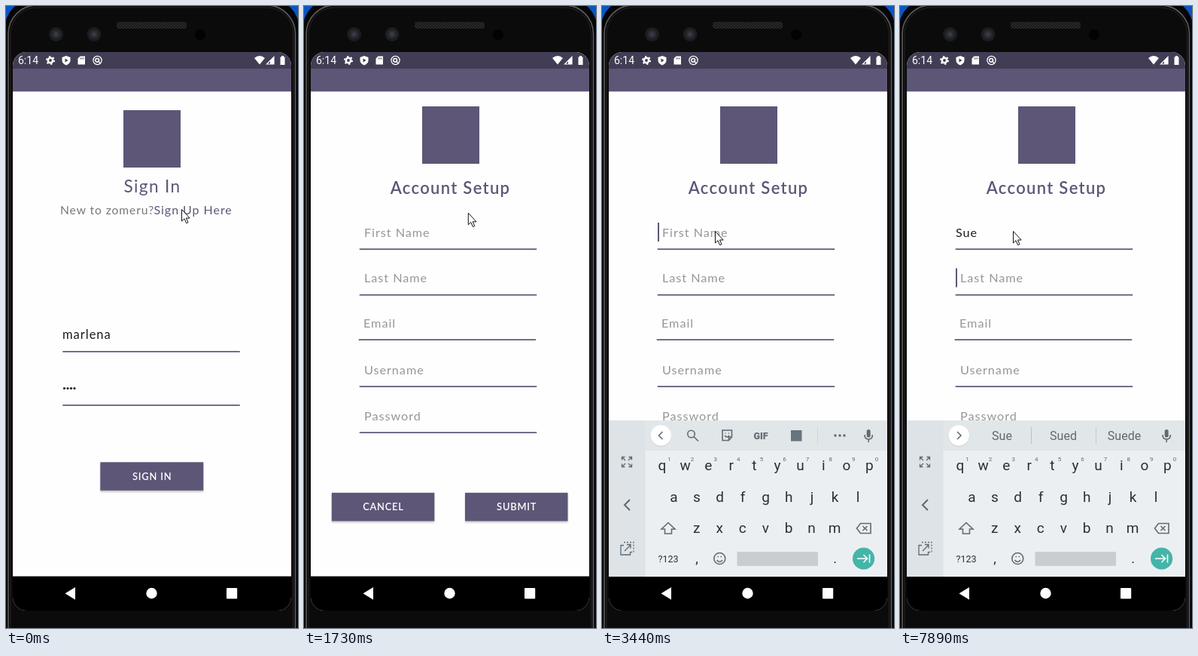
An HTML page for the animation above (8000 ms loop, 388 by 824 pixels).

```html
<!DOCTYPE html>
<html lang="en">
<head>
<meta charset="utf-8">
<title>Account setup</title>
<style>
  html, body { margin: 0; width: 100%; height: 100%; overflow: hidden; background: #0a57c2; }
  svg { display: block; width: 388px; height: 824px; }
  text { font-family: Lato, "Open Sans", sans-serif; letter-spacing: .06em; white-space: pre; }
  .keys text, .status text { font-family: Roboto, "Noto Sans", sans-serif; letter-spacing: 0; }
  .line { fill: none; stroke: #5f6b72; stroke-width: 1.6; }
</style>
</head>
<body>
<svg id="stage" viewBox="0 0 388 824"></svg>
<script>
const PURPLE = '#5d5677', INK = '#1c1c1c', HINT = '#969696', KEY = '#263238', GREY = '#5f6b72';
const FIELDS = [['First Name', 80, 322], ['Last Name', 80, 382.6], ['Email', 79, 442], ['Username', 80, 504], ['Password', 80, 565]];

const rect = (x, y, w, h, fill, extra = '') =>
  `<rect x="${x}" y="${y}" width="${w}" height="${h}" fill="${fill}" ${extra}/>`;
const circle = (x, y, r, fill, extra = '') =>
  `<circle cx="${x}" cy="${y}" r="${r}" fill="${fill}" ${extra}/>`;
const text = (s, x, y, size, fill, extra = '') =>
  `<text x="${x}" y="${y}" font-size="${size}" fill="${fill}" ${extra}>${s}</text>`;
const mid = (s, x, y, size, fill, extra = '') =>
  text(s, x, y, size, fill, 'text-anchor="middle" ' + extra);
const line = (d, extra = '') => `<path class="line" d="${d}" ${extra}/>`;
const underline = (x, y) => rect(x, y - .7, 235.5, 1.7, PURPLE);
const button = (label, x, y, w) =>
  rect(x, y + 2, w, 37.5, '#000', 'opacity=".22" filter="url(#soft)"') +
  rect(x, y, w, 37.5, PURPLE) +
  mid(label, x + w / 2 + .4, y + 23.3, 12.9, '#fff', 'font-weight="600"');

const page = body =>
  rect(9, 61, 370, 740, '#fefefe') + rect(9, 61, 370, 22, '#423d54') +
  rect(9, 83, 370, 30.3, PURPLE) + rect(9, 755.5, 370, 46, '#000') + body;

const signIn = page(
  rect(156, 138, 76, 76, PURPLE) +
  mid('Sign In', 194.5, 246.7, 22.6, PURPLE) +
  text('New to zomeru?', 72, 276, 15.6, '#777') +
  text('Sign Up Here', 196.5, 276, 16, PURPLE) +
  text('marlena', 75, 441, 16.5, INK) + underline(75.3, 457.7) +
  [77.5, 82, 86.5, 91].map(x => circle(x, 506.5, 1.6, INK)).join('') +
  underline(75.3, 528.7) + button('SIGN IN', 125.3, 604.3, 137));

const setup = page(
  rect(157, 133, 76, 76, PURPLE) +
  mid('Account Setup', 194.5, 248.5, 22, PURPLE, 'font-weight="600"') +
  FIELDS.map(([s, x, y], i) => text(s, x, y - 16.3, 16.2, HINT, `id="hint${i}"`) + underline(x - 6.3, y)).join('') +
  text('', 74, 305.5, 16.2, INK, 'id="typed"') +
  rect(74, 307, 0, 1, INK, 'id="compose"') + rect(74, 287, 2, 25, PURPLE, 'id="caret"') +
  button('CANCEL', 36.8, 644.8, 136.5) + button('SUBMIT', 214, 644.8, 136.5));

const row = (letters, x0, y) => [...letters].map((c, i) => mid(c, x0 + 30.6 * i, y, 19, KEY)).join('');

const keyboard =
  rect(9, 549, 370, 207, '#eceff1') + rect(57, 549, 322, 40, '#e1e6e9') + rect(9, 549, 48.5, 207, '#dee3e7') +
  // side panel
  line('M26.5 601.5v-4h4M27 598l4 4M39.500 601.500v-4h-4M39 598l-4 4M26.500 606.500v4h4M27 610l4-4M39.500 606.500v4h-4M39 610l-4-4', 'style="stroke-width:1.3"') +
  line('M37 654l-7 7l7 7', 'style="stroke-width:2"') +
  line('M29 714.500h-4v12.500h12.500v-4M30 722l8-8M33 713.500h5v5', 'style="stroke-width:1.3"') +
  line('M29 710.500h13v13h-4', 'style="stroke-width:1.3" stroke-dasharray="2 2"') +
  // top strip
  circle(78.3, 569.8, 13.8, '#000', 'opacity=".15"') + circle(78.3, 569, 13.7, '#fff') +
  line('', 'id="chevron"') +
  `<g id="tools">` +
    circle(118.5, 567, 4.7, 'none', 'class="line"') + line('M122 570.5l6 6') +
    line('M160 562h12.5v9l-4 4.500h-8.500zM168.500 575v-4h4M163 569q3 4 6 0M163.500 566h1M168 566h1') +
    mid('GIF', 211, 573.5, 12.5, GREY, 'font-weight="900"') +
    rect(251, 562, 14.5, 14.5, '#68757d') +
    rect(286, 558, 1, 22, '#cfd5d8') +
    [310, 316, 322].map(x => circle(x, 569, 1.7, GREY)).join('') +
  `</g><g id="words">` +
    rect(174, 558, 1, 22, '#b9c1c6') + rect(260, 558, 1, 22, '#c4cbd0') +
    [135.5, 217, 298].map(x => mid('', x, 575, 16, GREY)).join('') +
  `</g>` +
  rect(351.7, 561, 5, 10.5, GREY, 'rx="2.5"') + line('M349 568q0 6 5.200 6t5.200-6M354.200 574v4') +
  // letters
  row('qwertyuiop', 80, 615) + row('asdfghjkl', 95.3, 656.5) + row('zxcvbnm', 125.6, 697.5) +
  [...'1234567890'].map((c, i) => mid(c, 89.5 + 30.6 * i, 602.5, 8, GREY)).join('') +
  line('M88 684.500l9 8.500h-4.500v6h-9v-6h-4.500z') +
  line('M343.500 685.500h13.500v13h-13.500l-5-6.500zM346.500 689l6 6M352.500 689l-6 6') +
  mid('?123', 88, 737, 12.5, KEY) + mid(',', 126, 738, 18, KEY) + mid('.', 309.5, 738, 18, KEY) +
  circle(156.3, 732, 7.5, 'none', 'class="line"') + line('M152.500 734q3.800 4.500 7.600 0M153.500 729.500h1.500M157.500 729.500h1.500') +
  rect(179.5, 723, 107.5, 18.8, '#c8cdd0', 'rx="1.5"') +
  circle(347.6, 732, 14.6, '#45b5a8') +
  line('M339 732h13M347.500 727l5 5l-5 5M355.500 726.500v11', 'style="stroke:#fff"');

const statusIcons =
  text('6:14', 16, 77, 14, '#fff') +
  circle(59, 72, 3.2, 'none', 'stroke="#fff" stroke-width="2.6"') +
  circle(59, 72, 5, 'none', 'stroke="#fff" stroke-width="2" stroke-dasharray="2.2 3.036"') +
  `<path fill="#fff" d="M80 66l5.500 2v4q0 4-5.500 6.500q-5.500-2.500-5.500-6.500v-4zM98.500 66.500h6.500v11h-9.500v-8z"/>
   <path fill="#423d54" d="M78.500 69.500l4 2.500l-4 2.500zM98.500 68.500h1v2h-1zM100.500 68.500h1v2h-1zM102.500 68.500h1v2h-1z"/>` +
  circle(121.5, 72, 5.6, 'none', 'stroke="#fff" stroke-width="1.3"') +
  circle(121.2, 71.8, 2.4, 'none', 'stroke="#fff" stroke-width="1.5"') +
  `<path stroke="#fff" stroke-width="1.3" d="M122 72.500l3.500 3.500"/>
   <path fill="#fff" d="M330 69q7-6 14 0l-7 8.500zM364.500 67.500h1.500v-1.500h3v1.500h1.500v10.500h-6z"/>
   <path fill="none" stroke="#fff" stroke-width="1.2" d="M346.500 77h9.500v-9.500z"/><path fill="#fff" d="M351 77v-4.500l5-5v9.500z"/>`;

const lens = x => circle(x, 37.5, 9.5, '#1c1d1f') + circle(x, 37.5, 6, '#282a2e') + circle(x, 37.5, 3, '#363a42');

const stage = document.getElementById('stage');
stage.innerHTML = `
  <defs>
    <filter id="soft" x="-10%" y="-20%" width="120%" height="140%"><feGaussianBlur stdDeviation="1"/></filter>
    <clipPath id="screen">${rect(9, 61, 370, 740, '#000', 'rx="18"')}</clipPath>
    <clipPath id="app">${rect(9, 83, 370, 673, '#000')}</clipPath>
    <pattern id="mesh" width="4" height="4" patternUnits="userSpaceOnUse">
      ${rect(0, 0, 4, 4, '#2b2b2b')}<path d="M0 0l4 4M4 0l-4 4" stroke="#171717"/>
    </pattern>
  </defs>
  ${rect(0, 0, 388, 824, '#0a57c2')}
  ${rect(-1, -8, 390, 900, '#050505', 'rx="36"')}
  ${rect(3, -1, 381.5, 900, '#0b0b0b', 'rx="38" stroke="#5c5c5c" stroke-width="1.6"')}
  ${rect(6, 2, 375.5, 900, '#0b0b0b', 'rx="35" stroke="#262626"')}
  ${lens(66.5)}${lens(117)}${circle(258, 38, 7, '#020202')}
  ${rect(147, 21, 93, 9, 'url(#mesh)', 'rx="3"')}
  <g clip-path="url(#screen)">
    <g id="signIn">${signIn}</g>
    <g id="setup">${setup}</g>
    <g clip-path="url(#app)"><g id="keyboard" class="keys">${keyboard}</g></g>
  </g>
  <g class="status">${statusIcons}</g>
  <path fill="#fff" d="M92 770v16.500l-13.500-8.200z"/>
  ${circle(193.5, 778, 7.2, '#fff')}${rect(293, 771, 14.2, 14.2, '#fff', 'rx="1"')}
  <path id="pointer" fill="#fff" stroke="#111" d="M.5.5v15.500l3.500-3.300l2.600 6l2.400-1l-2.600-5.700h4.800z"/>`;

const $ = id => document.getElementById(id);
const show = (id, on) => $(id).setAttribute('display', on ? 'inline' : 'none');
const set = (id, attrs) => Object.entries(attrs).forEach(([k, v]) => $(id).setAttribute(k, v));
const zoom = s => `translate(194 431) scale(${s}) translate(-194 -431)`;
const steps = (t, start, n) => Math.max(0, Math.min(n, Math.floor((t - start) / 120) + 1));

const TYPING = [[7650, 'Sue', ['Sue', 'Sued', 'Suede']], [7030, 'Su', ['Su', 'Sun', 'Sum']], [6170, 'S', ['S', 'So', 'She']]];
const FOCUS = [7890, 7650, 7030, 6170, 2460];

function draw(t) {
  const open = steps(t, 1120, 3);
  show('signIn', open < 3);
  show('setup', open > 0);
  set('signIn', { transform: zoom([1, 1.034, 1.05, 1][open]) });
  set('setup', { transform: zoom([1, .96, .995, 1][open]), opacity: open == 1 ? .85 : 1 });

  const a = steps(t, 1730, 5) / 5, b = steps(t, 2460, 5);
  const nudge = Math.max(0, b - 1) / 4;
  set('pointer', { transform: `translate(${233 - 76 * a - 7 * nudge} ${269 + 24 * a + 5 * nudge})` });

  show('keyboard', b > 1);
  set('keyboard', { transform: `translate(0 ${[0, 0, 70, 12, 0, 0][b]})`, opacity: b == 2 ? .6 : 1 });

  const [, word, picks] = TYPING.find(e => t >= e[0]) || [0, '', null];
  $('typed').textContent = word;
  const width = word ? $('typed').getComputedTextLength() : 0;
  const last = t >= 7890;
  show('hint0', !word);
  set('compose', { width: last ? 0 : width });
  show('tools', !picks);
  show('words', picks);
  if (picks) $('words').querySelectorAll('text').forEach((el, i) => el.textContent = picks[i]);
  set('chevron', { d: picks ? 'M76 564l5 5l-5 5' : 'M80.500 564l-5 5l5 5' });

  const since = FOCUS.find(f => t >= f);
  show('caret', since && Math.floor((t - since + 10) / 495) % 2 == 0);
  set('caret', { x: last ? 74 : 74 + width, y: last ? 347.5 : 287 });
}

function tick() {
  draw(performance.now() % 8000);
  requestAnimationFrame(tick);
}
tick();
</script>
</body>
</html>
```
